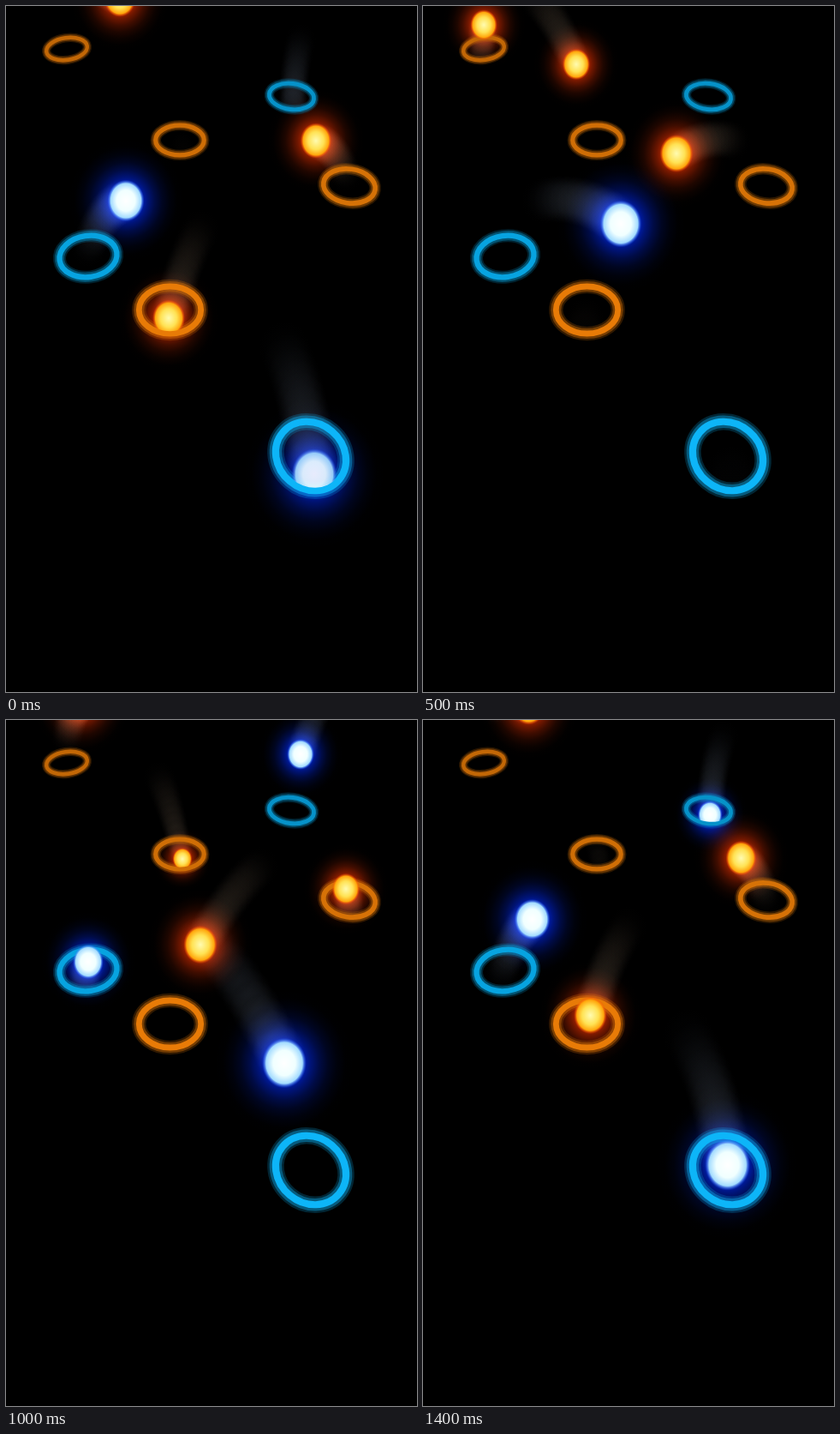
An HTML page with a canvas for the animation above (1.5 s loop, 480 px wide and 800 px high).

```html
<!DOCTYPE html>
<html lang="en">
<head>
<meta charset="utf-8">
<title>Portals</title>
<style>
  html, body { margin: 0; width: 100%; height: 100%; overflow: hidden; background: #000; }
  canvas { display: block; }
</style>
</head>
<body>
<canvas id="stage" width="480" height="800"></canvas>
<script>
const ctx = document.getElementById('stage').getContext('2d');
const LOOP = 1500, STEP = 100, KEY_GAP = 500, TRAIL = 500;

const FIRE = { hue: 31, glow: '235,48,0', trail: '62,52,42',
  core: ['#fffbb0', '#ffe254', '#ffa60c', 'rgba(255,60,0,0)'] };
const ICE = { hue: 197, glow: '0,42,255', trail: '50,56,66',
  core: ['#ffffff', '#f0ffff', '#a4dcff', 'rgba(30,90,255,0)'] };

// Rings grow, widen and brighten toward the viewer
function ring(skin, x, y, tilt) {
  return { x, y, tilt,
    rx: 22 + .04 * y,
    ry: 11 + .036 * y + .00003 * y * y,
    width: 5 + .01 * y,
    color: `hsl(${skin.hue}, 94%, ${38 + .025 * y}%)` };
}
const topLeft = ring(FIRE, 71, 50, -.14), topRight = ring(ICE, 333.5, 105.5, .12),
      upper = ring(FIRE, 203, 156.5, 0), right = ring(FIRE, 401, 210, .14),
      left = ring(ICE, 96, 292, -.14), middle = ring(FIRE, 191.5, 354.5, 0),
      lower = ring(ICE, 356, 525, .7);
const rings = [topLeft, topRight, upper, right, left, middle, lower];

// keys: places passed every KEY_GAP ms; size: quadratic curve over the flight
const balls = [
  { skin: ICE, from: left, to: lower, start: 500, size: [12, 27, 24],
    keys: [[90, 352], [96, 282], [140, 227], [231, 254], [325, 400], [360, 546], [368, 660]] },
  { skin: FIRE, from: right, to: middle, start: 500, size: [12, 22, 16],
    keys: [[402, 262], [397, 197], [362, 157], [296, 172], [227, 262], [190, 364], [176, 450]] },
  { skin: FIRE, from: topLeft, to: upper, start: 0, size: [10, 27, 4],
    keys: [[68, 92], [71, 22], [88, -20], [133, -8], [179, 68], [206, 162], [218, 250]] },
  { skin: ICE, from: topRight, to: topRight, start: 500, size: [14, 17, 8],
    keys: [[380, -52], [344, 40], [334, 127], [330, 200]] }
];

const clamp = v => Math.max(0, Math.min(1, v));

// Catmull-Rom curve through the keys
function along(keys, s) {
  const i = Math.min(Math.floor(s), keys.length - 2), u = s - i;
  const a = keys[i], b = keys[i + 1], before = keys[i - 1] || a, after = keys[i + 2] || b;
  return [0, 1].map(k => {
    const m0 = (b[k] - before[k]) / 2, m1 = (after[k] - a[k]) / 2, d = b[k] - a[k];
    return a[k] + u * (m0 + u * (3 * d - 2 * m0 - m1 + u * (m0 + m1 - 2 * d)));
  });
}

function ballAt(ball, time) {
  const s = (time - ball.start) / KEY_GAP, spans = ball.keys.length - 1;
  if (s < 0 || s > spans) return null;
  const [x, y] = along(ball.keys, s);
  const u = s / spans, v = 1 - u, [a, b, c] = ball.size;
  const gate = u < .5 ? ball.from : ball.to;
  return { x, y, gate,
    r: a * v * v + 2 * b * u * v + c * u * u,
    alpha: clamp(2 - 2 * (y - gate.y) / gate.ry) };
}

function blob(x, y, rx, ry, stops) {
  ctx.save();
  ctx.translate(x, y);
  ctx.scale(rx, ry);
  const g = ctx.createRadialGradient(0, 0, 0, 0, 0, 1);
  stops.forEach(([at, color]) => g.addColorStop(at, color));
  ctx.fillStyle = g;
  ctx.fillRect(-1, -1, 2, 2);
  ctx.restore();
}

// Hides whatever lies below the front rim of a ring
function clipped({ x, y, rx, ry, width, tilt }, draw) {
  ctx.save();
  ctx.beginPath();
  ctx.rect(0, 0, 480, y);
  ctx.ellipse(x, y, rx - width / 3, ry - width / 3, tilt, 0, 7);
  ctx.clip();
  draw();
  ctx.restore();
}

function drawRing({ x, y, rx, ry, width, tilt, color }) {
  ctx.save();
  ctx.strokeStyle = color;
  ctx.beginPath();
  ctx.ellipse(x, y, rx, ry, tilt, 0, Math.PI * 2);
  for (const spread of [1.9, 1.4, .8]) {
    ctx.globalAlpha = clamp(.75 / spread ** 2);
    ctx.lineWidth = width * spread;
    ctx.stroke();
  }
  ctx.restore();
}

function drawTrail(ball, time) {
  for (let age = TRAIL; age > 0; age -= STEP / 2) {
    const p = ballAt(ball, time - age);
    if (!p) continue;
    const alpha = .36 * p.alpha * (1.1 - age / TRAIL);
    const tint = a => `rgba(${ball.skin.trail},${a})`;
    clipped(p.gate, () => blob(p.x, p.y, p.r * 1.25, p.r * 1.35,
      [[0, tint(alpha)], [.55, tint(alpha * .8)], [1, tint(0)]]));
  }
}

function drawHalo(ball, p) {
  const stops = [];
  for (let s = 0; s <= 1; s += .125)
    stops.push([s, `rgba(${ball.skin.glow},${clamp(1.7 * (1 - s) ** 2.5)})`]);
  ctx.save();
  ctx.globalCompositeOperation = 'lighter';
  ctx.globalAlpha = p.alpha * .9;
  blob(p.x, p.y, p.r * 3.4, p.r * 3.6, stops);
  ctx.restore();
}

function drawCore(ball, p) {
  const stops = ball.skin.core.map((color, i) => [[0, .5, .82, 1][i], color]);
  clipped(p.gate, () => {
    ctx.globalAlpha = p.alpha;
    blob(p.x, p.y, p.r * 1.08, p.r * 1.22, stops);
  });
}

function render(time) {
  ctx.fillStyle = '#000';
  ctx.fillRect(0, 0, 480, 800);
  const passes = balls.flatMap(ball => [0, 1, 2].map(lap => [ball, time + lap * LOOP]));
  const live = passes.map(([ball, t]) => [ball, ballAt(ball, t)]).filter(([, p]) => p);
  passes.forEach(([ball, t]) => drawTrail(ball, t));
  live.forEach(([ball, p]) => drawHalo(ball, p));
  rings.forEach(drawRing);
  live.forEach(([ball, p]) => drawCore(ball, p));
}

const origin = performance.now();
function tick() {
  const elapsed = (performance.now() - origin) % LOOP;
  render(Math.floor(elapsed / STEP) * STEP);
  requestAnimationFrame(tick);
}
tick();
</script>
</body>
</html>
```
